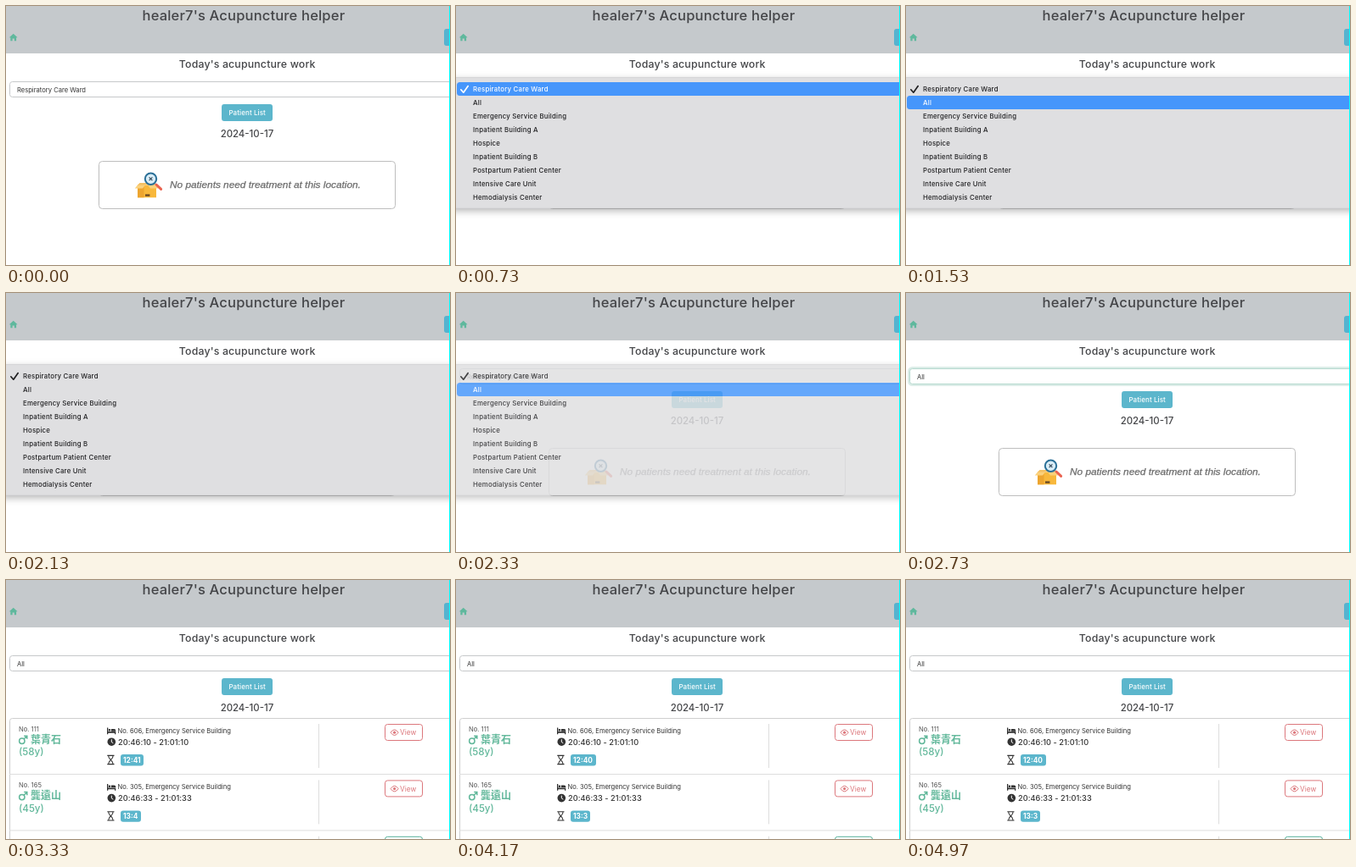
An HTML page for the animation above (5.01 s loop, 523 by 306 pixels).

```html
<!DOCTYPE html>
<html lang="en">
<head>
<meta charset="utf-8">
<title>Ward list</title>
<style>
  html, body { margin: 0; width: 100%; height: 100%; overflow: hidden; background: #fff; }
  svg { display: block; width: 523px; height: 306px; font-family: Inter, "Noto Sans CJK TC", "Noto Sans CJK", sans-serif; }
  text { white-space: pre; }
  .mid { text-anchor: middle; }
  .head { font-weight: 500; fill: #444548; }
  .item { font-size: 7.8px; letter-spacing: .22px; fill: #1f1f21; font-weight: 500; }
  .item.on { fill: #fff; }
  .small { font-size: 7.6px; fill: #333; }
  .time { font-size: 9.2px; letter-spacing: .04px; font-weight: 500; fill: #333; }
  .name { font-size: 12px; font-weight: 700; fill: #62b89b; }
  .age { font-size: 11.6px; font-weight: 500; fill: #62b89b; }
  .badge { font-size: 8.4px; font-weight: 700; fill: #fff; }
  .note { font: italic 11.83px "Liberation Sans", Arial, sans-serif; fill: #6a6a6a; stroke: #6a6a6a; stroke-width: .25px; }
  #menu .sheet { filter: drop-shadow(0 3px 4px rgba(0, 0, 0, .28)); }
</style>
</head>
<body>
<svg id="stage" viewBox="0 0 523 306">
  <defs>
    <g id="bed" fill="#333">
      <path d="M119 174.5h1.3v4.6h9v3.2h-1.3v-1.5h-7.7v1.5H119z"/>
      <circle cx="122" cy="177.3" r="1.3"/>
      <path d="M124 176h3.4q1.9 0 1.9 1.9v.8H124z"/>
    </g>
    <g id="clock">
      <circle cx="124.3" cy="191.2" r="4.8" fill="#333"/>
      <path d="M124.3 188.2v3.2l2 1.4" fill="none" stroke="#fff" stroke-width="1"/>
    </g>
    <g id="glass" fill="none" stroke="#333" stroke-width="1.1">
      <path d="M119.3 207.4h8.2M119.3 217.6h8.2M120.7 207.4c0 3 1.6 3.8 2.7 5.1-1.1 1.3-2.7 2.1-2.7 5.1M126.1 207.4c0 3-1.6 3.8-2.7 5.1 1.1 1.3 2.7 2.1 2.7 5.1"/>
    </g>
    <g id="mars" fill="none" stroke="#62b89b" stroke-width="1.5">
      <circle cx="18.8" cy="190.2" r="3.2"/>
      <path d="M21.2 187.8l3.4-3.4M21.2 184.2h3.6v3.6"/>
    </g>
    <g id="eye">
      <path d="M453 180.2q4.6-6.6 9.2 0q-4.6 6.6-9.2 0z" fill="none" stroke="#dc777c"/>
      <circle cx="457.6" cy="180.2" r="1.6" fill="#dc777c"/>
    </g>
  </defs>

  <rect width="523" height="306" fill="#fff"/>
  <rect width="523" height="56" fill="#c5c9cc"/>
  <text class="head" x="399.2" y="17" font-size="16.5" letter-spacing=".18" text-anchor="end">healer7's Acupuncture helper</text>
  <path d="M3.8 37.3l4.9-4.5 4.9 4.5h-1.5v3.9H9.8v-2.7H7.6v2.7H5.3v-3.9z" fill="#5fb89d"/>
  <rect x="516" y="27" width="20" height="20" rx="3" fill="#55b3cf"/>
  <text class="head mid" x="284.2" y="73" font-size="12.3" letter-spacing=".18">Today's acupuncture work</text>

  <rect id="glow" x="3.5" y="88.5" width="540" height="20" rx="4" fill="none" stroke="#dcede8" stroke-width="3"/>
  <rect id="box" x="4.5" y="89.5" width="540" height="18" rx="3" fill="#fff"/>
  <text id="value" class="small" x="13" y="102"></text>

  <rect x="254" y="116" width="60" height="20" rx="3" fill="#5cb6cc"/>
  <text class="mid" x="284.2" y="129" font-size="8" letter-spacing=".1" font-weight="500" fill="#fff">Patient List</text>
  <text class="head mid" x="283.9" y="154.6" font-size="11.4">2024-10-17</text>

  <g id="empty">
    <rect x="109.5" y="183.5" width="349" height="56" rx="4" fill="#fff" stroke="#bebebe"/>
    <path d="M155 211.5h22v14.8h-22z" fill="#f8b83c"/>
    <path d="M155 211.5h7.5v14.8H155z" fill="#eda52f"/>
    <path d="M155 211.5l-3.2 4h9.2l3-4zM177 211.5l2.5 4h-9.5l-3-4z" fill="#fbd17c"/>
    <path d="M155 211.5l2.5-2.5h17l2.5 2.5z" fill="#f3c064"/>
    <path d="M164 222.4h5.4v2.4H164z" fill="#6b4a24"/>
    <path d="M177 211l5.6 5.4" stroke="#ea6350" stroke-width="3" stroke-linecap="round"/>
    <circle cx="170.5" cy="204.3" r="6.7" fill="#d9edf7" stroke="#2b7098" stroke-width="2"/>
    <path d="M168.6 202.4l3.8 3.8m0-3.8l-3.8 3.8" stroke="#364b5c" stroke-width="1.2"/>
    <text class="note" x="193" y="215">No patients need treatment at this location.</text>
  </g>

  <g id="list"></g>

  <g id="menu">
    <rect class="sheet" x="-6" y="84.5" width="540" height="154.5" fill="#dfdfe1" stroke="#c9c9cb" stroke-width=".6"/>
    <rect id="bar" x="1" width="540" height="16" rx="3.5" fill="#4696fb"/>
    <path id="tick" d="M5.8 98.8l3 3.4 5.4-7.6" fill="none" stroke-width="1.7" stroke-linecap="round" stroke-linejoin="round"/>
  </g>
  <rect x="522" width="1" height="306" fill="#0ff"/>
</svg>
<script>
const LOOP = 5010;
const T = { open: 730, move: 1530, blink: 2130, blinkEnd: 2210, fade: 2290, pick: 2490, closed: 2530, list: 3330, count: 4150 };
const STEP = 40, PITCH = 66.4;
const wards = ['Respiratory Care Ward', 'All', 'Emergency Service Building', 'Inpatient Building A', 'Hospice',
  'Inpatient Building B', 'Postpartum Patient Center', 'Intensive Care Unit', 'Hemodialysis Center'];
const patients = [
  { no: 111, name: '葉青石', age: 58, bed: 606, span: '20:46:10 - 21:01:10', left: ['12:41', '12:40'], width: [27, 30] },
  { no: 165, name: '龔遠山', age: 45, bed: 305, span: '20:46:33 - 21:01:33', left: ['13:4', '13:3'], width: [24, 23] }
];
const $ = id => document.getElementById(id);
const show = (el, on) => el.setAttribute('visibility', on ? 'visible' : 'hidden');

const frame = (i, color) => `
  <g transform="translate(0 ${i * PITCH})">
    <path d="M4 229.5h540M368.5 170v52" stroke="#dedede"/>
    <rect x="446.5" y="170.5" width="44" height="19" rx="3" fill="#fff" stroke="${color}"/>
  </g>`;

const row = (p, i) => frame(i, '#dc777c') + `
  <g transform="translate(0 ${i * PITCH})">
    <text class="small" x="15" y="179" style="fill:#555">No. ${p.no}</text>
    <use href="#mars"/>
    <text class="name" x="29" y="193">${p.name}</text>
    <text class="age" x="15" y="207.4">(${p.age}y)</text>
    <use href="#bed"/><use href="#clock"/><use href="#glass"/>
    <text class="small" x="131.5" y="181">No. ${p.bed}, Emergency Service Building</text>
    <text class="time" x="132" y="194.6">${p.span}</text>
    <rect id="tag${i}" x="135" y="206" height="13.4" rx="3" fill="#5cb6cc"/>
    <text id="left${i}" class="badge" x="138" y="215.6"></text>
    <use href="#eye"/>
    <text x="464" y="183.2" font-size="8.3" fill="#dc777c">View</text>
  </g>`;

$('list').innerHTML = '<rect x="4.5" y="163.5" width="540" height="240" rx="3" fill="#fff" stroke="#cfcfcf"/>' +
  patients.map(row).join('') + frame(2, '#55b09a');

const items = wards.map((ward, i) => {
  const t = document.createElementNS('http://www.w3.org/2000/svg', 'text');
  t.setAttribute('x', 20);
  t.setAttribute('y', 100.9 + i * 16);
  t.textContent = ward;
  $('menu').append(t);
  return t;
});

function draw(t) {
  const listed = t >= T.list, picked = t >= T.pick;
  const focus = picked && !listed;
  show($('empty'), !listed);
  show($('list'), listed);
  show($('glow'), focus);
  $('box').setAttribute('stroke', focus ? '#b5d9ce' : '#c6c8ca');
  $('value').textContent = wards[picked ? 1 : 0];

  const blink = t >= T.blink && t < T.blinkEnd;
  const active = blink ? -1 : t < T.move ? 0 : 1;
  const faded = Math.floor(Math.max(0, t - T.fade) / STEP) * STEP / (T.closed - T.fade);
  $('menu').style.display = t >= T.open && t < T.closed ? '' : 'none';
  $('menu').style.opacity = 1 - Math.min(1, faded);
  $('bar').setAttribute('y', 90 + active * 16);
  $('bar').style.opacity = blink ? 0 : 1;
  $('tick').setAttribute('stroke', active === 0 ? '#fff' : '#1f1f21');
  items.forEach((el, i) => el.setAttribute('class', i === active ? 'item on' : 'item'));

  const k = t >= T.count ? 1 : 0;
  patients.forEach((p, i) => {
    $('left' + i).textContent = p.left[k];
    $('tag' + i).setAttribute('width', p.width[k]);
  });
}

const start = performance.now();
function tick() {
  draw((performance.now() - start) % LOOP);
  requestAnimationFrame(tick);
}
tick();
</script>
</body>
</html>
```
